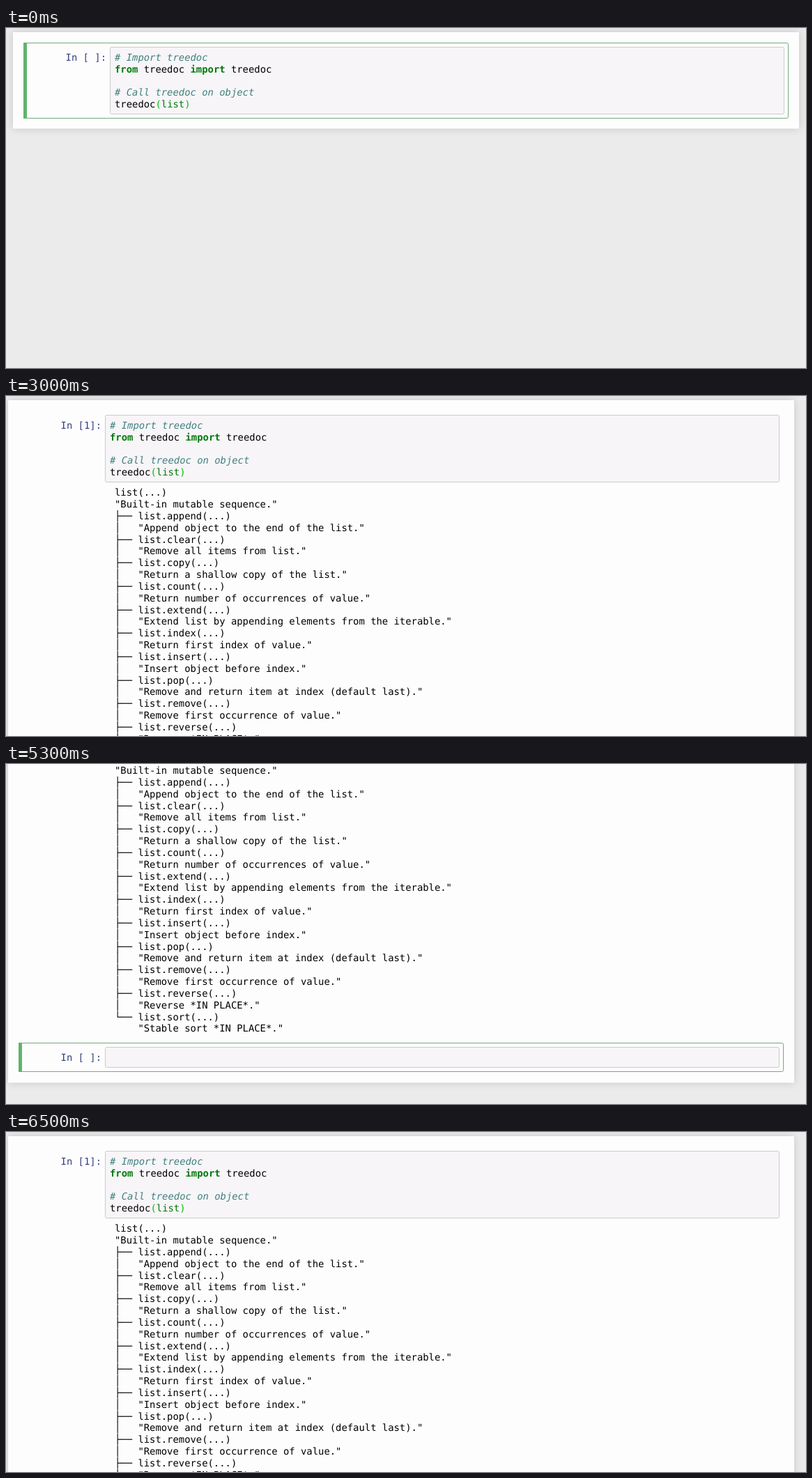
An HTML page for the animation above (8600 ms loop, 1148 by 488 pixels).

```html
<!DOCTYPE html>
<html lang="en">
<head>
<meta charset="utf-8">
<title>Notebook</title>
<style>
  html, body { margin: 0; width: 100%; height: 100%; overflow: hidden; background: #ebebeb; }
  svg { display: block; width: 100%; height: 100%; }
  text {
    font: 13.86px "DejaVu Sans Mono", monospace;
    white-space: pre;
    text-rendering: geometricPrecision;
  }
  .page { fill: #fefdfe; filter: drop-shadow(0 0 6px rgba(87, 87, 87, .26)); }
  .field { fill: #f7f5f7; stroke: #cbcbcb; }
  .frame { fill: none; stroke: #74aa7b; }
  .bar { fill: #5fb56b; }
  .prompt { fill: #333f7b; text-anchor: end; }
  .comment { fill: #408080; font-style: italic; }
  .keyword { fill: #007a0c; font-weight: bold; }
  .builtin { fill: #007a0c; }
  .bracket { fill: #0b1; }
</style>
</head>
<body>
<svg viewBox="0 0 1148 488"><g id="view"></g></svg>
<script>
const LOOP = 8600, LINE = 16.83;
const RUN = 2700, DONE = 3000;

// [time, scroll offset], each held until the next
const scrolls = [
  [0, 0], [4700, 17], [4800, 74], [5000, 91], [5100, 141], [5300, 146],
  [5700, 129], [5800, 72], [5900, 37], [6000, 8], [6500, 0]
];

const code = [
  [["comment", "# Import treedoc"]],
  [["keyword", "from"], ["", " treedoc "], ["keyword", "import"], ["", " treedoc"]],
  [],
  [["comment", "# Call treedoc on object"]],
  [["", "treedoc"], ["bracket", "("], ["builtin", "list"], ["bracket", ")"]]
];

const methods = {
  append: "Append object to the end of the list.",
  clear: "Remove all items from list.",
  copy: "Return a shallow copy of the list.",
  count: "Return number of occurrences of value.",
  extend: "Extend list by appending elements from the iterable.",
  index: "Return first index of value.",
  insert: "Insert object before index.",
  pop: "Remove and return item at index (default last).",
  remove: "Remove first occurrence of value.",
  reverse: "Reverse *IN PLACE*.",
  sort: "Stable sort *IN PLACE*."
};

function add(parent, tag, attrs, content) {
  const node = document.createElementNS("http://www.w3.org/2000/svg", tag);
  for (const key in attrs) node.setAttribute(key, attrs[key]);
  if (content) node.textContent = content;
  return parent.appendChild(node);
}

const show = (node, on) => node.setAttribute("display", on ? "inline" : "none");

// An input cell; its field is height - 12 tall
function makeCell(parent, height) {
  const root = add(parent, "g");
  const focus = add(root, "g");
  add(focus, "rect", { class: "frame", x: 25.5, y: 0, width: 1097, height, rx: 2 });
  add(focus, "rect", { class: "bar", x: 25, y: -0.5, width: 5, height: height + 1 });
  add(root, "rect", { class: "field", x: 149.5, y: 6, width: 967, height: height - 12, rx: 2 });
  const prompt = add(root, "text", { class: "prompt", x: 144, y: 25.2 }, "In [ ]:");
  return { root, focus, prompt };
}

const view = document.getElementById("view");
const page = add(view, "rect", { class: "page", x: 10, y: 6, width: 1128, height: 138.5 });

const first = makeCell(view, 108);
first.root.setAttribute("transform", "translate(0 21.5)");
code.forEach((parts, i) => {
  const line = add(first.root, "text", { x: 156, y: 25.2 + i * LINE });
  for (const [kind, str] of parts) add(line, "tspan", { class: kind }, str);
});
const caret = add(first.root, "rect", { x: 264, y: 79.5, width: 1, height: 17 });

const output = add(view, "g");
const names = Object.keys(methods);
const lines = ["list(...)", '"Built-in mutable sequence."'];
names.forEach((name, i) => {
  const last = i === names.length - 1;
  lines.push(`${last ? "└" : "├"}── list.${name}(...)`);
  lines.push(`${last ? " " : "│"}   "${methods[name]}"`);
});
lines.forEach((str, i) => add(output, "text", { x: 163, y: 143.3 + i * LINE }, str));

const next = makeCell(view, 41);

function draw(t) {
  const ran = t >= RUN, done = t >= DONE;
  const scroll = scrolls.filter(s => s[0] <= t).pop()[1];
  const top = done ? 546.5 : 129.5;

  // The scrollbar narrows the window once the output overflows it
  view.setAttribute("transform", `translate(${done ? -7 : 0} ${-scroll})`);
  page.setAttribute("height", ran ? top + 51 : 138.5);
  first.prompt.textContent = done ? "In [1]:" : ran ? "In [*]:" : "In [ ]:";
  show(first.focus, !ran);
  show(caret, (t >= 400 && t < 900) || (t >= 1400 && t < 2000));
  show(output, done);
  show(next.root, ran);
  next.root.setAttribute("transform", `translate(0 ${top})`);
}

const start = performance.now();
function tick() {
  draw((performance.now() - start) % LOOP);
  requestAnimationFrame(tick);
}
tick();
</script>
</body>
</html>
```
